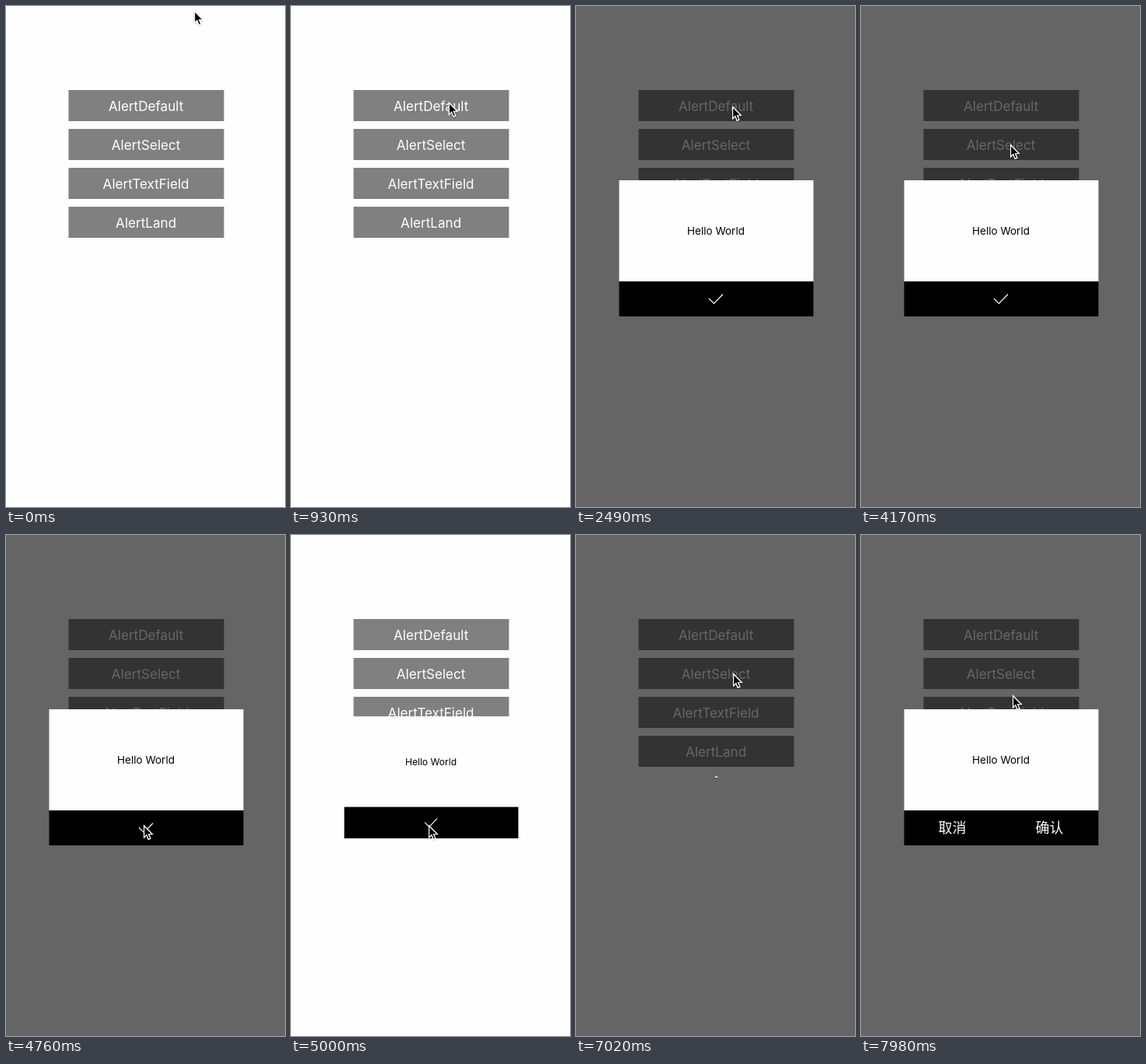
Write an HTML page with a canvas that moves like this. It is 359x644 px and loops after 8000 ms.

```html
<!DOCTYPE html>
<html lang="en">
<head>
<meta charset="utf-8">
<title>Alert demo</title>
<style>
  html, body { margin: 0; width: 100%; height: 100%; overflow: hidden; background: #fefefe; }
  canvas { display: block; width: 359px; height: 644px; }
</style>
</head>
<body>
<canvas id="stage"></canvas>
<script>
const W = 359, H = 644, LOOP = 8000;
const TICK = 117.5; // the screen refreshes in steps of this length
const GROW = 300;   // an alert opens or closes in this time
const PAPER = '#fefefe';
const CX = 180.5, CY = 311.5;
const LATIN = 'Inter, Roboto, sans-serif';
const CJK = '"Noto Sans CJK SC", "Noto Sans CJK", sans-serif';

const canvas = document.getElementById('stage');
const ctx = canvas.getContext('2d');
const dpr = window.devicePixelRatio || 1;
canvas.width = Math.round(W * dpr);
canvas.height = Math.round(H * dpr);

const HOME = { x: 242, y: 6 };
const MOVES = [
  { at: 0, steps: 8, x: 201, y: 129 },
  { at: 4052, steps: 1, x: 192, y: 178 },
  { at: 4170, steps: 5, x: 177, y: 373 },
  { at: 5582, steps: 5, x: 202, y: 178 },
  { at: 7862, steps: 1, x: 195, y: 206 }
];

// lead: how far the growth had come when the first refresh showed it
const ALERTS = [
  { open: { at: 2250, lead: 74 }, close: { at: 5000, lead: 60 }, footer: drawCheck },
  { open: { at: 7020, lead: 20 }, close: { at: LOOP, lead: 0 }, footer: drawChoices }
];

const ticks = (t, at) => Math.floor((t - at) / TICK);

function ease(v) {
  v = Math.min(1, Math.max(0, v));
  return v * v * (3 - 2 * v);
}

function growth(t, { at, lead }) {
  return t < at ? 0 : ease((ticks(t, at) * TICK + lead) / GROW);
}

function pointerAt(t) {
  let { x, y } = HOME;
  for (const move of MOVES) {
    const p = ease(ticks(t, move.at) / move.steps);
    x += (move.x - x) * p;
    y += (move.y - y) * p;
  }
  return [x, y];
}

function rect(x, y, w, h, color) {
  ctx.fillStyle = color;
  ctx.fillRect(x, y, w, h);
}

function label(text, x, y, size, color, family = LATIN) {
  ctx.font = `${size}px ${family}`;
  ctx.fillStyle = color;
  ctx.fillText(text, x, y);
}

function trace(points) {
  ctx.beginPath();
  points.forEach(([x, y]) => ctx.lineTo(x, y));
}

function drawButtons() {
  ['AlertDefault', 'AlertSelect', 'AlertTextField', 'AlertLand'].forEach((name, i) => {
    const y = 108 + i * 50;
    rect(CX - 100, y, 200, 40, '#808080');
    label(name, CX - .4, y + 26.5, 17.1, '#fff');
  });
}

function drawCheck() {
  trace([[-9.5, 64.5], [-3, 71], [8.5, 59]]);
  ctx.strokeStyle = '#fff';
  ctx.lineWidth = 1.2;
  ctx.stroke();
}

function drawChoices() {
  label('取消', -63, 71, 18, '#fff', CJK);
  label('确认', 62, 71, 18, '#fff', CJK);
}

function drawAlert(scale, footer) {
  ctx.save();
  ctx.translate(CX, CY);
  ctx.scale(scale, scale);
  rect(-125, -87.5, 250, 130, PAPER);
  rect(-125, 42.5, 250, 45, '#000');
  label('Hello World', -.5, -17.5, 13.5, '#000');
  footer();
  ctx.restore();
}

function drawPointer(x, y) {
  ctx.save();
  ctx.translate(x, y);
  trace([[.6, .8], [.6, 15.8], [3.9, 12.6], [6.2, 18.2], [8.8, 17.1],
    [6.5, 11.7], [11.2, 11.5]]);
  ctx.closePath();
  ctx.shadowColor = 'rgba(0,0,0,.4)';
  ctx.shadowBlur = 2 * dpr;
  ctx.shadowOffsetY = .5 * dpr;
  ctx.strokeStyle = '#fff';
  ctx.lineWidth = 1.2;
  ctx.stroke();
  ctx.shadowColor = 'transparent';
  ctx.fillStyle = '#000';
  ctx.fill();
  ctx.stroke();
  ctx.restore();
}

function draw(t) {
  ctx.setTransform(dpr, 0, 0, dpr, 0, 0);
  ctx.textAlign = 'center';
  ctx.textBaseline = 'alphabetic';
  rect(0, 0, W, H, PAPER);
  drawButtons();
  for (const { open, close, footer } of ALERTS) {
    if (t >= open.at && t < close.at) rect(0, 0, W, H, 'rgba(0,0,0,.6)');
    const scale = growth(t, open) - growth(t, close);
    if (scale > .005) drawAlert(scale, footer);
  }
  drawPointer(...pointerAt(t));
}

const start = performance.now();
function loop() {
  draw((performance.now() - start) % LOOP);
  requestAnimationFrame(loop);
}
loop();
</script>
</body>
</html>
```
